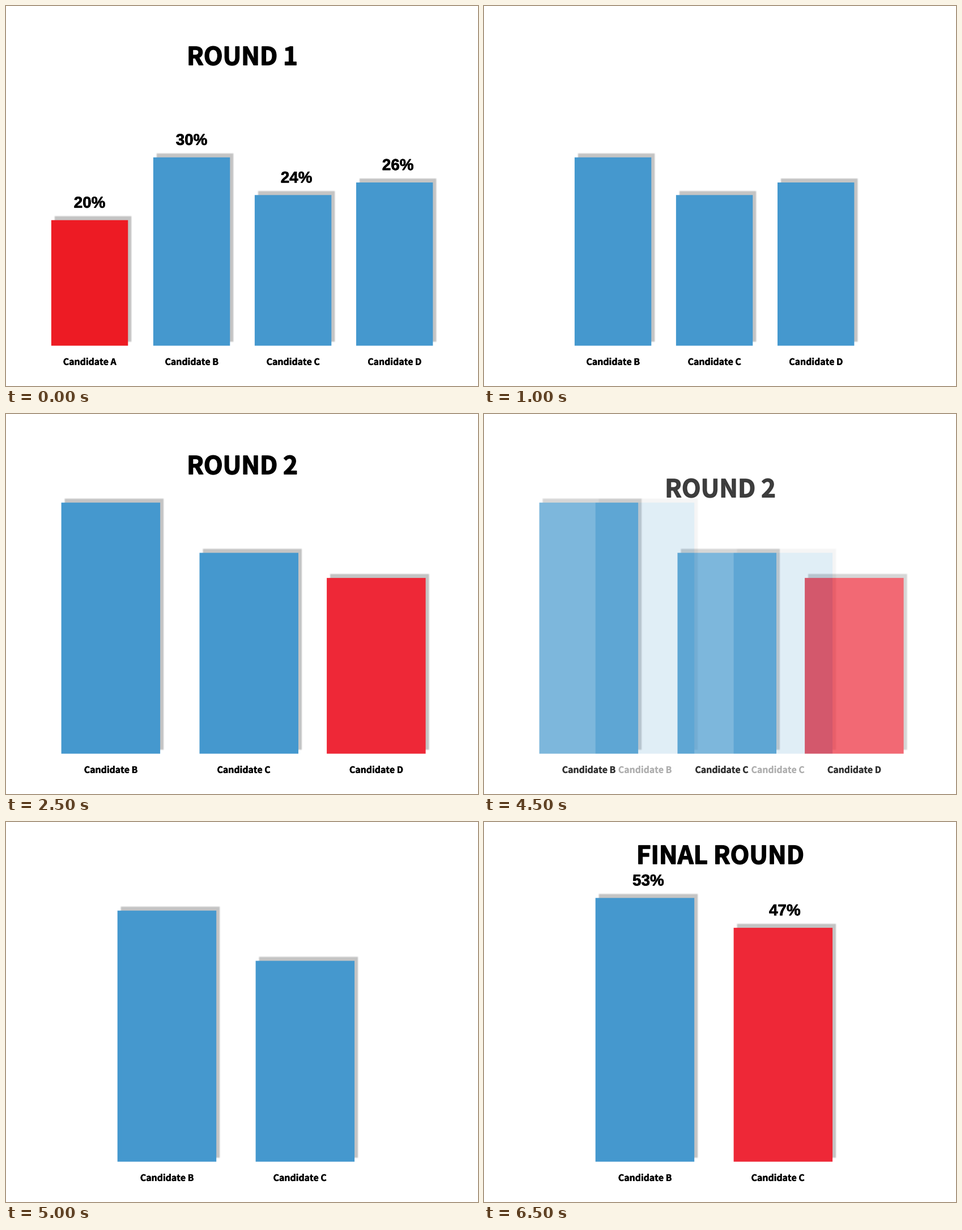
A matplotlib script that plays this animation: 833 by 672 pixels, repeating every 8 s.

```python
import numpy as np
import matplotlib.pyplot as plt
from matplotlib.animation import FuncAnimation
from matplotlib.patheffects import withStroke

W, H, DPI = 833, 672, 64
STEP_MS, LOOP_MS, FADE_STEPS = 100, 8000, 6
BOTTOM = 600.7
MIDDLE = 352  # title baseline when it sits at mid-stage
BLUE, RED, CRIMSON = (69, 152, 206), (238, 41, 55), (237, 28, 36)
SHADOW = (196, 196, 196)

# font family, size and extra stroke in pixels
TITLE = ("Noto Sans CJK JP", 43.7, 1.5)
LABEL = ("Noto Sans CJK JP", 15.8, 0.4)
PERCENT = ("Liberation Sans", 27.8, 0.7)


def coverage(n, start, end, soft):
    """How much of each pixel lies between start and end."""
    pos = np.arange(n) + 0.5
    rise = np.clip((pos - start) / soft + 0.5, 0, 1)
    fall = np.clip((end - pos) / soft + 0.5, 0, 1)
    return rise * fall


def paint(img, x, top, width, bottom, color, soft=1):
    mask = np.outer(coverage(H, top, bottom, soft),
                    coverage(W, x, x + width, soft))[..., None]
    img += mask * (np.array(color) / 255 - img)


class Slide:
    """Bars are (letter, x, height, colour, label shift, percent, percent shift)."""

    def __init__(self, width, bars, title=None, title_y=0):
        self.title, self.title_y = title, title_y
        self.image = np.ones((H, W, 3))
        self.texts = []
        for letter, x, height, color, shift, percent, percent_shift in bars:
            top, mid = BOTTOM - height, x + width / 2
            paint(self.image, x + 6, top - 7, width, BOTTOM - 7, SHADOW, 3)
            paint(self.image, x, top, width, BOTTOM, color)
            self.texts.append((mid + shift, 634.8, f"Candidate {letter}", LABEL))
            if percent:
                self.texts.append((mid + percent_shift, top - 22, f"{percent}%", PERCENT))


def bar(letter, x, height, color=BLUE, shift=0, percent=None, percent_shift=0):
    return letter, x, height, color, shift, percent, percent_shift


UNIT, FINAL_UNIT = 11.1, 8.8
slides = [
    Slide(135.4, [
        bar("A", 79.9, 20 * UNIT, CRIMSON, 0, 20),
        bar("B", 259.9, 30 * UNIT, BLUE, 0, 30),
        bar("C", 438.9, 24 * UNIT, BLUE, 0, 24, 6),
        bar("D", 618, 26 * UNIT, BLUE, 0, 26, 6)], "ROUND 1", 104.3),
    Slide(135.4, [
        bar("B", 159.9, 30 * UNIT),
        bar("C", 338.9, 24 * UNIT),
        bar("D", 518, 26 * UNIT)]),
    Slide(174.5, [
        bar("B", 97.6, 40 * UNIT),
        bar("C", 341.5, 32 * UNIT, BLUE, -9.3),
        bar("D", 566.1, 28 * UNIT, RED)], "ROUND 2", 106.3),
    Slide(174.5, [
        bar("B", 196.7, 40 * UNIT),
        bar("C", 440.6, 32 * UNIT, BLUE, -9.3)]),
    Slide(174.5, [
        bar("B", 196.7, 53 * FINAL_UNIT, BLUE, 0, 53, 6),
        bar("C", 440.6, 47 * FINAL_UNIT, RED, -9.3, 47, 3)], "FINAL ROUND", 74),
]
fade_starts = [500, 2000, 4500, 6000]

fig = plt.figure(figsize=(W / DPI, H / DPI), dpi=DPI, facecolor="white")
ax = fig.add_axes([0, 0, 1, 1])


def write(x, y, text, style, alpha, z):
    family, px, stroke = style
    heavier = withStroke(linewidth=stroke * 72 / DPI, foreground="black")
    ax.text(x, y, text, fontsize=px * 72 / DPI, family=family, weight="bold",
            color="black", ha="center", va="baseline", alpha=alpha, zorder=z,
            path_effects=[heavier])


def show(slide, alpha, z):
    ax.imshow(slide.image, extent=(0, W, H, 0), interpolation="nearest",
              aspect="auto", alpha=alpha, zorder=z)
    for x, y, text, style in slide.texts:
        write(x, y, text, style, alpha, z + 1)


def show_title(slide, drop, alpha, z):
    if slide.title:
        y = slide.title_y + (MIDDLE - slide.title_y) * drop
        write(417, y, slide.title, TITLE, alpha, z)


def draw(frame):
    ax.clear()
    ax.axis("off")
    t = frame * STEP_MS
    index, p = 0, 1
    for i, start in enumerate(fade_starts):
        if t >= start:
            index = i + 1
            p = min(1, ((t - start) // STEP_MS + 1) / FADE_STEPS)
    if p < 1:
        old = slides[index - 1]
        show(old, 1 - p, 1)
        show_title(old, p, (1 - p) ** 2, 3)
    new = slides[index]
    show(new, p, 4)
    show_title(new, 1 - p, p ** 1.2, 6)
    ax.set_xlim(0, W)
    ax.set_ylim(H, 0)
    return []


anim = FuncAnimation(fig, draw, frames=LOOP_MS // STEP_MS, interval=STEP_MS,
                     init_func=lambda: [], repeat=True, repeat_delay=0, blit=False)
plt.show()
```
